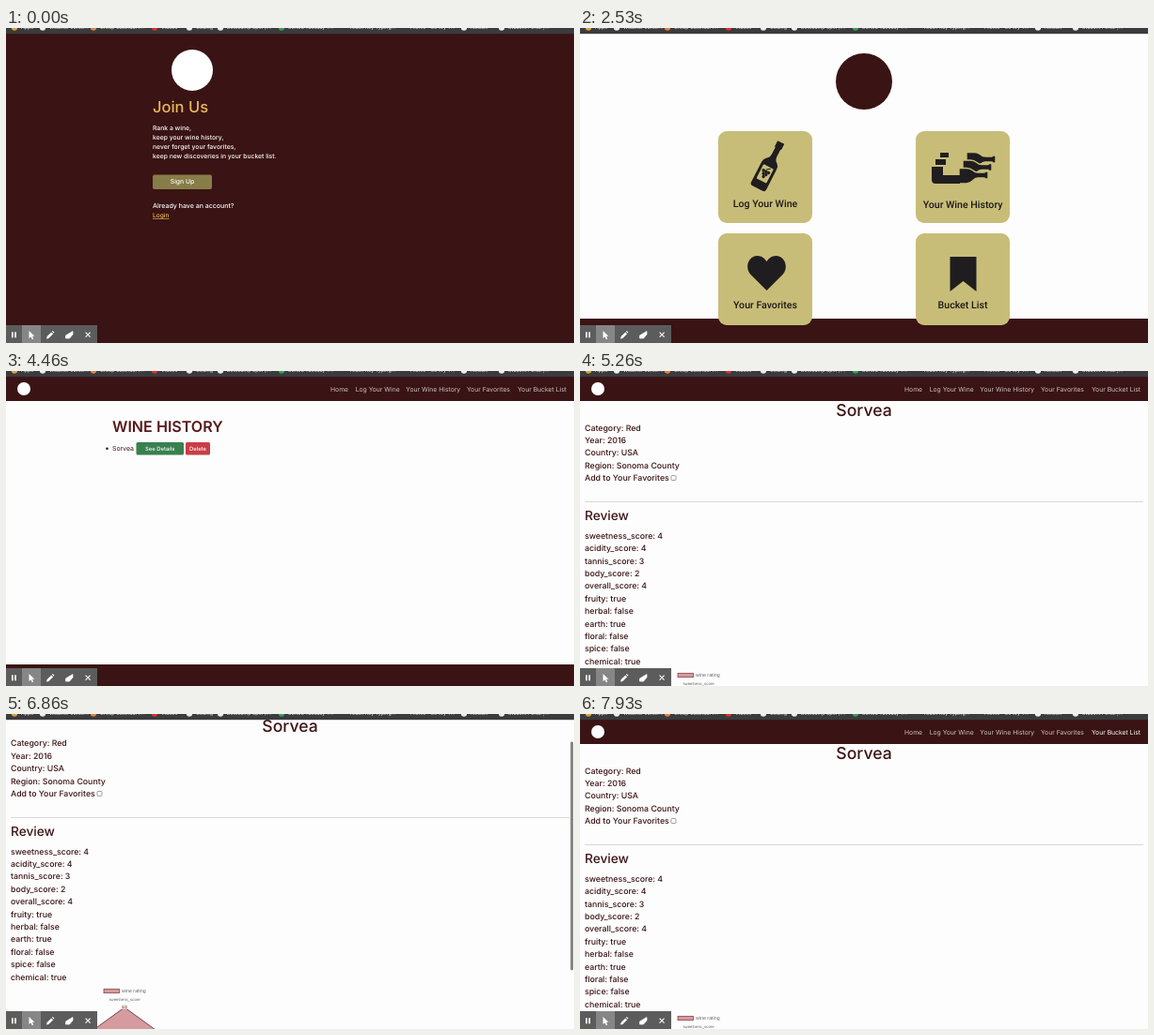
An HTML page for the animation above (8 s loop, 604 by 336 pixels).

```html
<!DOCTYPE html>
<html lang="en">
<head>
<meta charset="utf-8">
<title>Wine journal walkthrough</title>
<style>
  html, body { margin: 0; width: 100%; height: 100%; overflow: hidden; background: #3a1314; }
  svg { display: block; width: 100%; height: 100%; }
  text { font-family: Inter, sans-serif; white-space: pre; text-rendering: geometricPrecision; }
  .label { font-family: Roboto, sans-serif; font-weight: 500; }
  .chart text { font-family: "Liberation Sans", Arial, sans-serif; }
</style>
</head>
<body>
<svg id="stage" viewBox="0 0 604 336"></svg>
<script>
const WINE = '#3a1314', PAPER = '#fdfdfd', GOLD = '#e8b95c', CARD = '#c8bd78', INK = '#201d20';
const LOOP = 8000;

const rect = (x, y, w, h, fill, extra = '') =>
  `<rect x="${x}" y="${y}" width="${w}" height="${h}" fill="${fill}" ${extra}/>`;
const dot = (x, y, r, fill) => `<circle cx="${x}" cy="${y}" r="${r}" fill="${fill}"/>`;
const path = (d, fill, extra = '') => `<path d="${d}" fill="${fill}" ${extra}/>`;
const text = (x, y, size, fill, str, extra = '') =>
  `<text x="${x}" y="${y}" font-size="${size}" fill="${fill}" ${extra}>${str}</text>`;
const lines = (x, y, step, size, fill, list, extra) =>
  list.map((str, i) => text(x, y + i * step, size, fill, str, extra)).join('');
const group = (id, body, extra = '') => `<g id="${id}" ${extra}>${body}</g>`;

const MIDDLE = 'text-anchor="middle" ';
const MEDIUM = 'font-weight="500" ';

function joinPage() {
  return rect(0, 0, 604, 336, WINE)
    + dot(198, 45, 22, '#fff')
    + text(156, 90.4, 16.5, GOLD, 'Join Us', MEDIUM)
    + lines(156, 108.7, 10.1, 6.8, '#fff', ['Rank a wine,', 'keep your wine history,',
      'never forget your favorites,', 'keep new discoveries in your bucket list.'], MEDIUM)
    + rect(156, 156.5, 63, 15.5, '#877d48', 'rx="2"')
    + text(187.5, 166.4, 6.8, '#fff', 'Sign Up', MIDDLE + MEDIUM)
    + text(156, 192, 7, '#fff', 'Already have an account?', MEDIUM)
    + text(156, 202.1, 6.6, GOLD, 'Login', MEDIUM + 'text-decoration="underline"');
}

function bottleIcon() {
  const grapes = [[-3, 7], [0, 7], [3, 7], [-1.5, 10], [1.5, 10], [0, 13]];
  return '<g transform="translate(201 147) rotate(27)">'
    + path('M-4-28h8v7h-1v8q0 5 3.5 7 2.5 2 2.5 6v24q0 3-3 3h-12q-3 0-3-3v-24q0-4 2.5-6 3.5-2 3.5-7v-8h-1z', INK)
    + rect(-6, 1, 12, 17, CARD, 'rx="1"')
    + grapes.map(([x, y]) => dot(x, y, 1.7, INK)).join('')
    + path('M-1 5l4-3', 'none', `stroke="${INK}"`)
    + '</g>';
}

function rackIcon() {
  const bottle = 'M403 149.500h8q4 0 7 2.500 2 2 5 2h7v-1h4v8h-4v-1h-7q-3 0-5 2.500-3 3.500-7 3.500h-8z';
  const lying = [[8, -17], [4, -8.5], [0, 0]].map(([x, y]) =>
    path(bottle, INK, `stroke="${CARD}" stroke-width="1.4" transform="translate(${x} ${y})"`)).join('');
  return rect(383, 133, 9, 5, INK) + rect(378, 140, 11, 6, INK)
    + lying
    + path('M374 148h12v9h18v9h-26q-4 0-4-4z', INK);
}

function homePage() {
  const cards = [[147, 110, 'Log Your Wine', 191], [357, 110, 'Your Wine History', 191.5],
    [147, 219, 'Your Favorites', 298.5], [357, 219, 'Bucket List', 298.5]];
  return rect(0, 0, 604, 336, PAPER) + rect(0, 310, 604, 26, WINE)
    + dot(302, 57, 30, WINE)
    + cards.map(([x, y, name, base]) => rect(x, y, 100, 98, CARD, 'rx="9"')
      + text(x + 50, base, 10.6, '#1c191a', name, MIDDLE + 'class="label"')).join('')
    + bottleIcon() + rackIcon()
    + path('M198.500 280l-17-17c-7-8-2-20 7-20 5 0 8 3 10 6 2-3 5-6 10-6 9 0 14 12 7 20z', INK)
    + path('M393.500 244h28v37l-14-11-14 11z', INK);
}

function navBar(bucketId = '') {
  const links = [[345, 'Home'], [371.7, 'Log Your Wine'], [425.3, 'Your Wine History'],
    [490, 'Your Favorites'], [544, 'Your Bucket List']];
  return rect(0, 0, 604, 32, WINE) + dot(19, 19, 7, '#fff')
    + links.map(([x, name], i) => text(x, 21.5, 6.8, '#cdc3c3', name,
      i === 4 && bucketId ? `id="${bucketId}"` : '')).join('');
}

function historyPage() {
  return rect(0, 0, 604, 336, PAPER) + rect(0, 313, 604, 23, WINE) + navBar()
    + text(113, 64.6, 16.1, '#57191b', 'WINE HISTORY', 'font-weight="600"')
    + dot(107.5, 82.7, 1.3, WINE)
    + text(113, 85, 6.9, WINE, 'Sorvea')
    + rect(138.5, 76, 50.5, 13.5, '#39804f', 'rx="1.5"')
    + text(163.7, 84.9, 5.9, '#fff', 'See Details', MIDDLE + MEDIUM)
    + rect(191, 76, 26, 13.5, '#c93d47', 'rx="1.5"')
    + text(204, 84.9, 5.9, '#fff', 'Delete', MIDDLE + MEDIUM);
}

// Radar scale runs from 2 at the centre to 4 at the rim.
function radarChart() {
  const cx = 126, cy = 392, radius = 50;
  const names = ['sweetness_score', 'acidity_score', 'tannis_score', 'body_score', 'overall_score'];
  const scores = [4, 4, 3, 2, 4];
  const at = (i, r) => {
    const a = i * Math.PI * 2 / 5 - Math.PI / 2;
    return [cx + r * Math.cos(a), cy + r * Math.sin(a)];
  };
  const ring = r => names.map((_, i) => at(i, r)).join(' ');
  const grid = [.25, .5, .75, 1].map(k =>
    `<polygon points="${ring(radius * k)}" fill="none" stroke="#ddd" stroke-width=".5"/>`).join('');
  const corners = scores.map((s, i) => at(i, radius * (s - 2) / 2));
  const titles = names.slice(1).map((name, i) => {
    const [x, y] = at(i + 1, radius + 4);
    return text(x, y + 2, 4.3, '#666', name, `text-anchor="${x > cx ? 'start' : 'end'}"`);
  }).join('');
  return group('chart',
    rect(104, 322.3, 16.5, 4.4, '#d59b9e', 'stroke="#7d3237" stroke-width=".7"')
    + text(123, 326.4, 5.3, '#666', 'wine rating')
    + text(cx, 334.9, 4.3, '#666', names[0], MIDDLE)
    + grid
    + `<polygon points="${corners.join(' ')}" fill="#d59b9e" stroke="#5d2528" stroke-width=".8"/>`
    + corners.map(([x, y]) => dot(x, y, 1.2, '#7d3237')).join('')
    + rect(cx - 3, 339.5, 6, 4.4, '#e8d5d5') + text(cx, 343.3, 4, '#555', '4.0', MIDDLE)
    + titles, 'class="chart"');
}

function detailPage() {
  return rect(0, 0, 604, 336, PAPER)
    + group('content', navBar('bucket')
      + text(302, 48.2, 17.6, WINE, 'Sorvea', MIDDLE + MEDIUM)
      + lines(5, 63.5, 13.4, 8.75, WINE, ['Category: Red', 'Year: 2016', 'Country: USA',
        'Region: Sonoma County', 'Add to Your Favorites'], MEDIUM)
      + rect(97, 111.5, 5, 5, '#fff', 'rx="1" stroke="#777" stroke-width=".7"')
      + rect(5, 139, 594, .8, '#d4cfcf')
      + text(5, 159.3, 13.7, WINE, 'Review', MEDIUM)
      + lines(5, 178.7, 13.4, 8.75, WINE, ['sweetness_score: 4', 'acidity_score: 4',
        'tannis_score: 3', 'body_score: 2', 'overall_score: 4', 'fruity: true', 'herbal: false',
        'earth: true', 'floral: false', 'spice: false', 'chemical: true'], MEDIUM)
      + radarChart())
    + rect(600.3, 8, 2.8, 244, '#000', 'id="thumb" rx="1.4"');
}

function bookmarkBar() {
  const marks = [[9, '#d9a13f', 'Apps'], [39, '#eee', 'Weather Junior...'],
    [93, '#e8833a', 'Group Calendar I...'], [158, '#e02f2f', 'Videos'], [195, '#eee', 'Coding'],
    [228, '#eee', 'Bootcamp Split (f...'], [293, '#35a35b', 'Sorted Tuesday T...'],
    [358, '', 'Touch Key Typing...'], [422, '', 'Theme - So Wy T...'],
    [487, '#eee', 'Notebk'], [527, '#eee', 'Student Portal |...']];
  return rect(0, 0, 604, 6.2, '#3b3b3d')
    + marks.map(([x, color, name]) => (color ? dot(x, -.5, 3.2, color) : '')
      + text(x + 7, 1.3, 5.3, '#e4e4e4', name)).join('');
}

function toolbar() {
  return rect(0, 317, 97, 19, '#5c5c5c') + rect(17, 317, 20, 19, '#868686')
    + rect(6, 324.3, 1.7, 6, '#fff') + rect(9.2, 324.3, 1.7, 6, '#fff')
    + path('M24.500 323v8l2-1.700 1.300 2.900 1.400-.6-1.300-2.800h2.500z', '#fff')
    + path('M43 331.500l.6-2.400 4.700-4.700 1.800 1.800-4.700 4.700zM48.900 323.800l.8-.8 1.800 1.800-.8.8z', '#fff')
    + path('M63.500 328l7.500-4.500v3.300l-3.500 4.200h-4z', '#fff', 'stroke="#fff" stroke-width=".7" stroke-linejoin="round"')
    + path('M84.600 324.700l5 5m0-5l-5 5', 'none', 'stroke="#fff" stroke-width="1.1"');
}

const pages = [['join', 0, joinPage], ['home', 2060, homePage],
  ['history', 3860, historyPage], ['detail', 4800, detailPage]];

document.getElementById('stage').innerHTML =
  pages.map(([id, , draw]) => group(id, draw())).join('') + bookmarkBar() + toolbar();
const el = id => document.getElementById(id);

const scrollKeys = [[6330, 0], [6400, 1.7], [6860, 28.8], [7060, 76], [7300, 0]];

function scrollAt(t) {
  const next = scrollKeys.findIndex(([time]) => time > t);
  if (next < 1) return 0;
  const [t0, y0] = scrollKeys[next - 1], [t1, y1] = scrollKeys[next];
  return y0 + (y1 - y0) * (t - t0) / (t1 - t0);
}

function render(t) {
  const current = pages.findLast(([, start]) => t >= start)[0];
  pages.forEach(([id]) => el(id).setAttribute('display', id === current ? 'inline' : 'none'));

  const scroll = scrollAt(t);
  const fade = t < 6330 ? 0 : Math.min(1, Math.max(0, (7700 - t) / 200));
  el('content').setAttribute('transform', `translate(0 ${-scroll})`);
  el('thumb').setAttribute('y', 8 + scroll * .74);
  el('thumb').setAttribute('opacity', .5 * fade);
  el('bucket').setAttribute('fill', t > 7600 ? '#fff' : '#cdc3c3');
}

const start = performance.now();
function tick() {
  render((performance.now() - start) % LOOP);
  requestAnimationFrame(tick);
}
tick();
</script>
</body>
</html>
```
